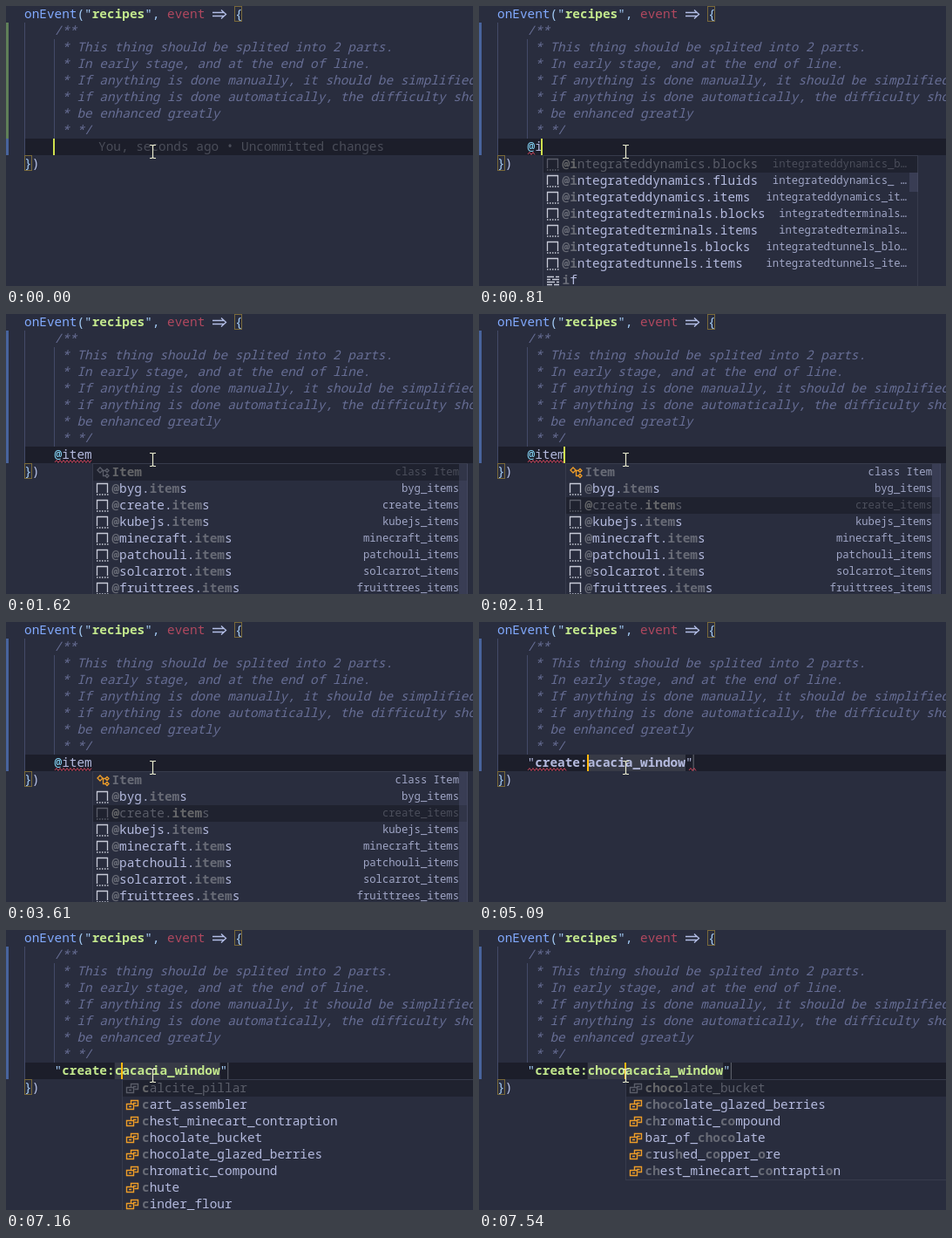
An HTML page that plays this animation: 536 px wide and 321 px high, repeating every 8000 ms.

```html
<!DOCTYPE html>
<html lang="en">
<head>
<meta charset="utf-8">
<title>Editor completion</title>
<style>
html, body { margin: 0; width: 100%; height: 100%; overflow: hidden; background: #292d3e; }
svg { display: block; }
text { font: 500 14.4px "Noto Sans Mono", "DejaVu Sans Mono", monospace; white-space: pre; font-variant-ligatures: none; }
.comment { font-style: italic; fill: #676e95; }
.detail { font-size: 12.24px; text-anchor: end; }
</style>
</head>
<body>
<svg id="stage" width="536" height="321" viewBox="0 0 536 321"></svg>
<script>
const LOOP = 8000, LEFT = 21, CELL = 8.64, ROW = 19;
const INK = '#b4bade', BLUE = '#82aaff', CYAN = '#a5cdf8', GREEN = '#c3e88d';
const DIM = '#686b76', FADED = '#5a5d69', ORANGE = '#ee9d28', RED = '#c4455a';
const stage = document.getElementById('stage');
const col = n => LEFT + n * CELL;

const rect = (x, y, w, h, fill, extra = '') =>
  `<rect x="${x}" y="${y}" width="${w}" height="${h}" fill="${fill}" ${extra}/>`;
const line = (d, color, extra = '') => `<path d="${d}" fill="none" stroke="${color}" ${extra}/>`;
const span = (s, color, weight = 500) => `<tspan fill="${color}" font-weight="${weight}">${s}</tspan>`;
const text = (x, y, body, extra = '') => `<text x="${x}" y="${y}" ${extra}>${body}</text>`;

function wave(from, to) {
  let d = `M${from} 170`;
  for (let x = from + 2, up = true; x <= to; x += 2, up = !up) d += `L${x} ${up ? 167.5 : 170.5}`;
  return line(d, RED);
}

// Square brackets in a label mark the matched letters.
const mark = (prefix, names) => names.split(' ').map(n => ['value', `[${prefix}]` + n.slice(prefix.length)]);
const mods = 'byg create kubejs minecraft patchouli solcarrot fruittrees'.split(' ');
const itemList = typed => [['class', `[${typed[0].toUpperCase() + typed.slice(1)}]${'Item'.slice(typed.length)}`, 'class Item'],
  ...mods.map(m => ['snippet', `[@]${m}.[${typed}]${'items'.slice(typed.length)}`, m + '_items'])];

const lists = {
  at: ['byg', 'create', 'fruittrees'].flatMap(m => ['blocks', 'fluids', 'items']
    .map(k => ['snippet', `[@]${m}.${k}`, `${m}_${k}`])).slice(0, 8),
  i: [...['dynamics.blocks _b', 'dynamics.fluids _ ', 'dynamics.items _it', 'terminals.blocks ', 'terminals.items ',
    'tunnels.blocks _blo', 'tunnels.items _ite'].map(s => {
      const cut = s.indexOf(' '), name = s.slice(0, cut);
      return ['snippet', `[@i]ntegrated${name}`, `integrated${name.split('.')[0]}${s.slice(cut + 1)}…`];
    }), ['keyword', '[i]f']],
  it: itemList('it'), ite: itemList('ite'), item: itemList('item'),
  all: mark('', 'acacia_window acacia_window_pane adjustable_chain_gearshift analog_lever andesite_alloy andesite_belt_funnel andesite_casing andesite_funnel'),
  c: mark('c', 'calcite_pillar cart_assembler chest_minecart_contraption chocolate_bucket chocolate_glazed_berries chromatic_compound chute cinder_flour'),
  ch: mark('ch', 'chest_minecart_contraption chocolate_bucket chocolate_glazed_berries chromatic_compound chute'),
  choco: '[choco]late_bucket [choco]late_glazed_berries [ch]r[o]matic_[co]mpound bar_of_[choco]late [c]rus[h]ed_[co]pper_[o]re [ch]est_minecart_[co]ntrapti[o]n'
    .split(' ').map(n => ['value', n])
};

// Each step changes part of the state from its time on.
const steps = [
  [0, { typed: '', caret: true, blame: true, gutter: '#5f7f58' }],
  [370, { typed: '@', blame: false }],
  [460, { list: 'at', pick: 0, thumb: 22 }],
  [560, { gutter: '#48639c', error: 1 }],
  [750, { typed: '@i', list: 'i' }],
  [940, { typed: '@it', list: 'it', thumb: 149 }],
  [1030, { typed: '@ite', list: 'ite' }],
  [1120, { typed: '@item', list: 'item' }],
  [1500, { error: 5 }],
  [1620, { caret: false }],
  [1990, { pick: 1 }],
  [2110, { pick: 2, caret: true }],
  [2610, { caret: false }],
  [3070, { caret: true }],
  [3610, { caret: false }],
  [4130, { caret: true }],
  [4580, { caret: false }],
  [5090, { typed: '', quoted: true, caret: true, list: null, pick: 0, thumb: 0, ink: INK }],
  [5160, { list: 'all', ink: GREEN }],
  [5540, { error: 0 }],
  [5600, { caret: false }],
  [6110, { caret: true }],
  [6600, { caret: false }],
  [7090, { typed: 'c', caret: true }],
  [7160, { list: 'c' }],
  [7280, { typed: 'ch', list: 'ch' }],
  [7370, { typed: 'cho', list: 'choco' }],
  [7450, { typed: 'choc' }],
  [7540, { typed: 'choco' }]
];

const icons = {
  snippet: c => line('M.5 11V.5H12.5V11', c, 'stroke-width="1.3"') + line('M0 13H14', c, 'stroke-width="1.3" stroke-dasharray="1.5 1.5"'),
  value: c => line('M5.5 5V1.5H13.5V7.5H9.5M.5 5.5H8.5V11.5H.5ZM8 4.5H11.5M3 8.5H6', c, 'stroke-width="1.4"'),
  class: c => line('M1 4L4 1L7 4L4 7ZM6 4.5H10M7.5 4.5V10.5H10M10 4.5L12 2.5L14 4.5L12 6.5ZM10 10.5L12 8.5L14 10.5L12 12.5Z', c, 'stroke-width="1.3"'),
  keyword: c => line('M0 2.5H8M10 2.5H14M0 5.5H4M6 5.5H14M0 8.5H9M11 8.5H14M0 11.5H6M8 11.5H14', c, 'stroke-width="1.3"')
};

function label(s, picked) {
  return s.split(/[\[\]]/).map((part, i) => i % 2
    ? span(part, picked ? '#656669' : DIM, 700)
    : span(part, picked ? FADED : INK)).join('');
}

function popup(s, caretX) {
  const x = Math.round(caretX) + 1, rows = lists[s.list];
  let out = rect(x - .5, 171.5, 430, rows.length * ROW + 1, '#292d3e', 'stroke="#373b4c"');
  rows.forEach(([kind, name, detail], i) => {
    const y = 172 + i * ROW, picked = i === s.pick;
    if (picked) out += rect(x, y, 429, ROW, '#1f222f');
    const tint = picked ? FADED : kind === 'value' || kind === 'class' ? ORANGE : '#c8cbd8';
    out += `<g transform="translate(${x + 4} ${y + 3})">${icons[kind](tint)}</g>`;
    out += text(caretX + 22.7, y + 14, label(name, picked));
    if (detail) {
      const end = x + (detail.endsWith('…') ? 417 : 420);
      out += text(end, y + 13, detail, `class="detail" fill="${picked ? '#4b4e5b' : '#a0a6c6'}"`);
    }
  });
  if (s.thumb) out += rect(x + 420, s.thumb < 100 ? 191 : 172, 10, s.thumb, '#676e95', 'opacity=".25"');
  return out;
}

const comment = ['/**', ' * This thing should be splited into 2 parts.', ' * In early stage, and at the end of line.',
  ' * If anything is done manually, it should be simplified', ' * if anything is done automatically, the difficulty should',
  ' * be enhanced greatly', ' * */'];
const box = (x, y) => rect(x + .5, y + .5, 8, 17, 'none', 'stroke="#79693a"');
const code = rect(LEFT, 152, 515, ROW, '#1c1e2a')
  + line('M21.5 19V171', '#434a68') + line('M55.5 38V152', '#434a68')
  + box(262, 0) + box(21, 171)
  + text(LEFT, 14, span('onEvent', BLUE) + span('("', CYAN) + span('recipes', GREEN, 600) + span('", ', CYAN) + span('event', '#b0485f'))
  + line('M237 7.5H250M237 11.5H250M247 4.5L252.5 9.5L247 14.5', '#b4bfe8', 'stroke-width="1.3"')
  + text(col(28), 14, '{', `fill="${CYAN}"`)
  + text(LEFT, 185, span('}', CYAN) + span(')', '#b9c4ea'))
  + comment.map((s, i) => text(col(4), 33 + i * ROW, s, 'class="comment"')).join('');
const pointer = line('M165 159.5H167.5L168.5 160.5L169.5 159.5H172M168.5 160V174M165 174.5H167.5L168.5 173.5L169.5 174.5H172', '#e9ebcf', 'stroke-width="1.2"');

function draw(s) {
  const caretCol = (s.quoted ? 12 : 4) + s.typed.length, caretX = col(caretCol);
  let out = code + rect(0, 19, 3, 133, s.gutter) + rect(0, 152, 3, ROW, '#48639c');
  if (s.blame) out += text(106, 166, 'You, seconds ago • Uncommitted changes', 'fill="#4a4d59"');
  if (s.quoted) {
    const end = caretCol + 13;
    out += rect(col(12), 152, (end - 12) * CELL, ROW, '#373a46')
      + rect(col(end + 1), 152, 1, ROW, '#676a73')
      + text(col(4), 166, span('"', s.ink === GREEN ? CYAN : s.ink) + span(`create:${s.typed}acacia_window`, s.ink, 600) + span('"', s.ink === GREEN ? CYAN : s.ink));
    if (s.error) out += wave(56, 100) + wave(241, 250);
  } else {
    out += text(col(4), 166, span(s.typed.slice(0, 1), '#89ddff') + span(s.typed.slice(1), INK));
    if (s.error) out += wave(56, col(4 + s.error));
  }
  if (s.caret) out += rect(Math.round(caretX) - (s.quoted ? 1 : 2), 152, 2, ROW, s.quoted ? '#ffb90f' : '#cfe04d');
  if (s.list) out += popup(s, caretX);
  stage.innerHTML = out + pointer;
}

let shown = -1;
function tick(now) {
  const t = now % LOOP, past = steps.filter(([at]) => at <= t);
  if (past.length !== shown) {
    shown = past.length;
    draw(Object.assign({}, ...past.map(([, change]) => change)));
  }
  requestAnimationFrame(tick);
}
tick(0);
</script>
</body>
</html>
```
